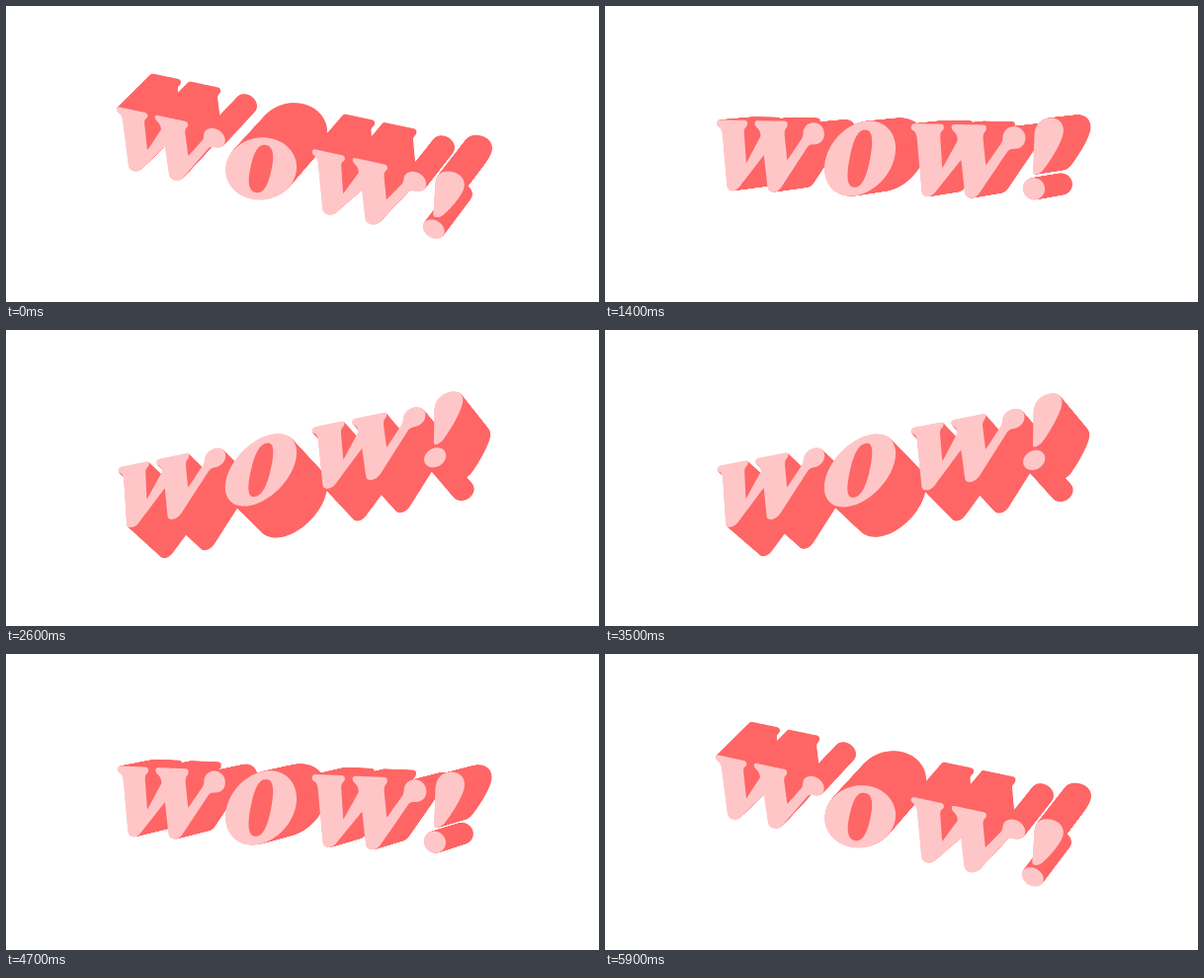
Recreate the animation shown at these times as an HTML page with a canvas. Size 600x300 px, loop 6 s.

```html
<!DOCTYPE html>
<html lang="en">
<head>
<meta charset="utf-8">
<title>wow!</title>
<style>
  html, body { margin: 0; height: 100%; overflow: hidden; background: #fff; }
  canvas { display: block; }
</style>
</head>
<body>
<canvas id="stage" width="600" height="300" role="img" aria-label="wow!"></canvas>
<script>
const ctx = document.getElementById('stage').getContext('2d');
const LIGHT = '#ffc6c8', DARK = '#ff6666';
const LOOP = 6000, STEP = 100;
const YAW = 23.5 * Math.PI / 180, PITCH = Math.PI / 6;
const FRONT = 39, BACK = -39, CAMERA = 2900;

const W = `M0,-29 Q0,-33 4,-33 H29 Q32.5,-33 32.5,-30 Q32.5,-27.5 30.5,-26
  Q28.5,-24 29,-19 L31,11 L46,-17 Q46,-23 42,-26 Q40,-28 40,-30 Q40,-33 43,-33
  H71 Q74,-33 74,-30 Q74,-27 72,-25.5 Q70.5,-23 71,-18 L73.5,7 L87,-13
  Q90,-17 90,-21 C90,-27 95,-32 101,-32 C107,-32 111.7,-27 111.7,-21
  C111.7,-14 107,-10 101,-10 Q97,-10 95,-8
  L67,35 Q63.5,39.5 59,39.5 Q53.5,39.5 53,34 L49.5,2 L24,35
  Q20.5,39.5 16.5,39.5 Q11,39.5 10.5,34 L6,-18 Q5,-25 2,-26 Q0,-27 0,-29Z`;
const BANG = `M144.3,10 L145.3,-22 C145.3,-35 152.3,-41 161.3,-41
  C169.3,-41 174.3,-35 172.8,-26 C171,-16 159.5,3 153,11
  Q149,15 145.3,14.3 Q143.8,14 144.3,10Z`;

// Outline points of an SVG path, shifted by dx
function outline(d, dx) {
  const path = document.createElementNS('http://www.w3.org/2000/svg', 'path');
  path.setAttribute('d', d);
  const length = path.getTotalLength(), count = Math.ceil(length / 1.5);
  return Array.from({ length: count }, (_, i) => {
    const p = path.getPointAtLength(length * i / count);
    return [p.x + dx, p.y];
  });
}

// Oval whose top leans to the right by lean; power below 1 squares it off
function oval(cx, cy, rx, ry, lean, power = 1) {
  const bend = n => Math.sign(n) * Math.abs(n) ** power;
  return Array.from({ length: 72 }, (_, i) => {
    const a = i * Math.PI / 36, c = bend(Math.cos(a)), s = bend(Math.sin(a));
    return [cx + rx * c - lean * s, cy + ry * s];
  });
}

const letters = [
  outline(W, -174),
  oval(-26.3, 3.3, 34.4, 38, 10.5),
  outline(W, 25),
  outline(BANG, 0),
  oval(145, 28.7, 10.5, 10.7, 0)
];
const hole = oval(-26.3, 3.3, 10.3, 29, 5.5, 0.8);

function fillShape(points, depth, pitch, color) {
  const sin = Math.sin(pitch), cos = Math.cos(pitch);
  ctx.beginPath();
  for (const [px, py] of points) {
    const x = px - depth * Math.sin(YAW);
    const z = px * Math.tan(YAW) + depth * Math.cos(YAW);
    const scale = CAMERA / (CAMERA - z * cos + py * sin);
    ctx.lineTo(300 + x * scale, 150 + (py * cos + z * sin) * scale);
  }
  ctx.closePath();
  ctx.fillStyle = color;
  ctx.fill();
}

function draw(time) {
  const pitch = PITCH * Math.cos(2 * Math.PI * time / LOOP);
  ctx.clearRect(0, 0, 600, 300);
  for (let depth = BACK; depth < FRONT; depth++) {
    for (const letter of letters) fillShape(letter, depth, pitch, DARK);
  }
  for (const letter of letters) fillShape(letter, FRONT, pitch, LIGHT);
  fillShape(hole, FRONT, pitch, DARK);
}

let shown = -1;
function tick() {
  const time = Math.floor(performance.now() % LOOP / STEP) * STEP;
  if (time !== shown) draw(shown = time);
  requestAnimationFrame(tick);
}
tick();
</script>
</body>
</html>
```
